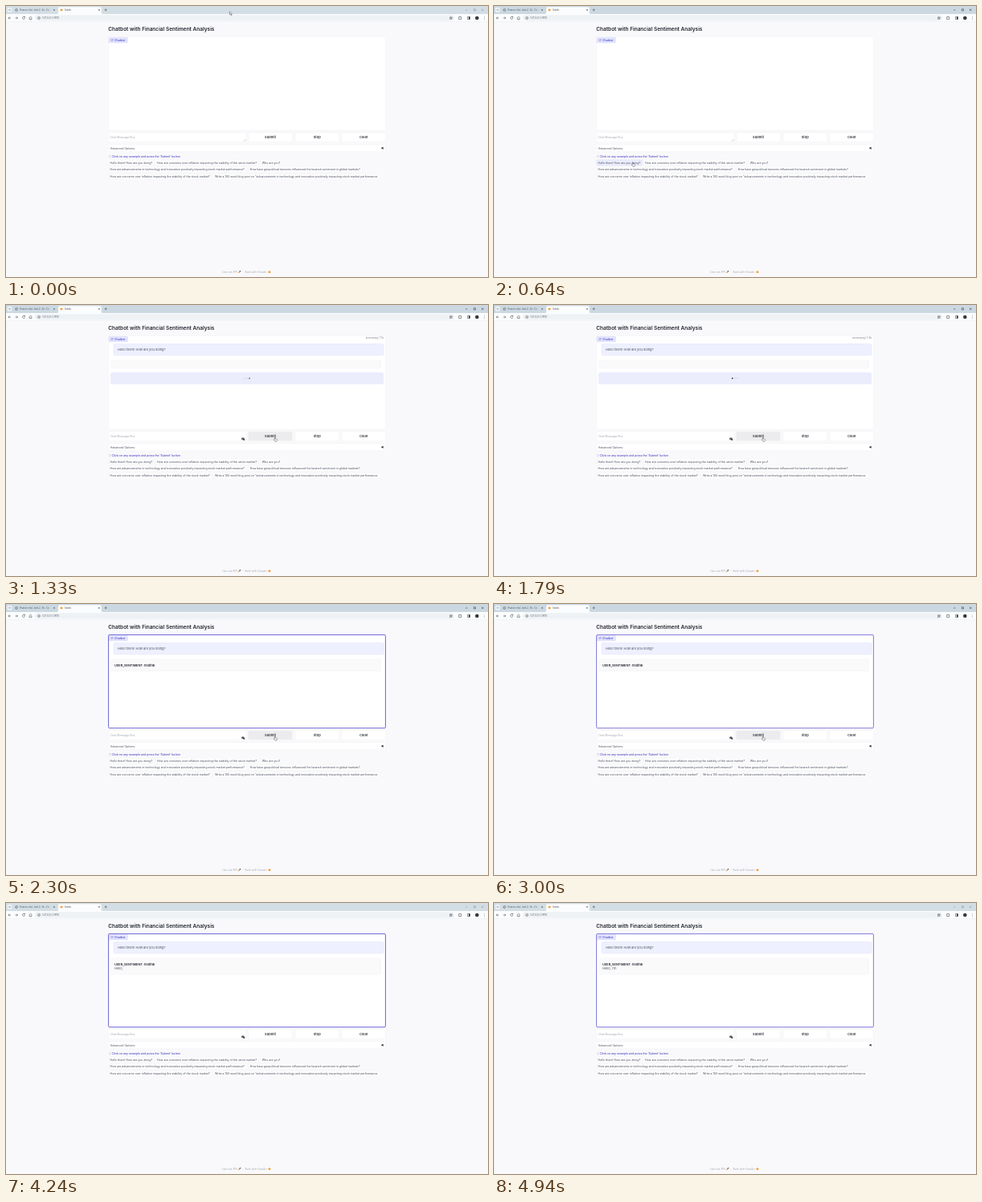
An HTML page that plays this animation: 600 by 338 pixels, repeating every 5 s.

```html
<!DOCTYPE html>
<html lang="en">
<head>
<meta charset="utf-8">
<title>Chatbot</title>
<style>
html, body { margin: 0; width: 100%; height: 100%; overflow: hidden; background: #f9f9fb; }
svg { display: block; width: 100vw; height: 100vh; }
text { font: 3.49px Inter, sans-serif; fill: #4b5160; white-space: pre; }
.ui { font: 2.7px "Open Sans", sans-serif; fill: #4a5258; }
.title { font-size: 6.5px; font-weight: 600; fill: #20242e; }
.button { font-size: 4.05px; font-weight: 600; fill: #2a2f3a; text-anchor: middle; }
.message { font-size: 3.95px; }
.strong { font-size: 3.88px; font-weight: 600; fill: #22262f; }
.accent { fill: #5148c8; font-weight: 500; }
.pale { fill: #a5a9b3; }
.timer { font-size: 2.9px; fill: #6b7080; text-anchor: end; }
.line { fill: none; stroke: #4a5258; stroke-width: .6; }
</style>
</head>
<body>
<svg id="stage" viewBox="0 0 600 338"></svg>
<script>
const LOOP = 5000;
const stage = document.getElementById('stage');

const box = (x, y, w, h, fill, stroke = 'none', r = 1, id = '') =>
  `<rect id="${id}" x="${x}" y="${y}" width="${w}" height="${h}" rx="${r}" fill="${fill}" stroke="${stroke}" stroke-width=".4"/>`;
const text = (x, y, s, cls = '', id = '') => `<text id="${id}" x="${x}" y="${y}" class="${cls}">${s}</text>`;
const line = d => `<path class="line" d="${d}"/>`;
const dot = (x, y, r, fill) => `<circle cx="${x}" cy="${y}" r="${r}" fill="${fill}"/>`;
const button = (x, label, id = '') =>
  box(x, 158, 54.5, 11.3, '#fff', '#efeff3', 1.2, id) + text(x + 27.2, 165.1, label, 'button');
const chip = (x, y, w, s, id = '') =>
  box(x - 1.7, y - 4.6, w + 3.6, 6.8, '#fcfcfd', '#f1f1f5', 1.2, id) + text(x, y, s);

const inflation = 'How are concerns over inflation impacting the stability of the stock market?';
const advances = 'advancements in technology and innovation positively impacting stock market performance';

const browser = `
  ${box(0, 0, 600, 10, '#cfdbe3', 'none', 0, 'strip')}
  ${box(1.5, 1.8, 6, 6, '#eaf0f4', 'none', 1.6)}${line('M3.5 4.3l1.1 1.1l1.1 -1.1')}
  <circle class="line" cx="13" cy="5" r="1.4"/>
  ${text(17, 6, 'Finance chat - bert-2 - fin - Co', 'ui')}
  ${line('M59 4l1.8 1.8m0 -1.8l-1.8 1.8')}
  <path d="M63.5 10q1.5 0 1.5 -1.5V3q0 -1.7 1.7 -1.7H117q1.7 0 1.7 1.7V8.5q0 1.5 1.5 1.5z" fill="#fbfcfd"/>
  ${box(67.5, 3.8, 3, 2.4, '#f5a23a', 'none', .8)}${text(72.7, 6, 'Gradio', 'ui')}
  ${line('M115 4l1.8 1.8m0 -1.8l-1.8 1.8M124.2 3.4v3m-1.5 -1.5h3')}
  <path id="controls" fill="none" stroke-width=".55" d="M572 5h2.4M582.3 3.8h2.2v2.2h-2.2zM592 3.7l2.4 2.4m0 -2.4l-2.4 2.4"/>
  ${box(0, 10, 600, 9.6, '#fbfcfd', 'none', 0)}
  ${box(36, 11.2, 522, 7.2, '#eef2f5', 'none', 3.6)}
  ${line('M6 15H3m1.3 -1.4L3 15l1.3 1.4M11.5 15h3m-1.3 -1.4l1.3 1.4l-1.3 1.4')}
  ${line('M23.2 13.7a1.6 1.6 0 1 0 .4 1.6M23.6 12.8v1.3h-1.3M29 16.5v-2l1.5 -1.3l1.5 1.3v2z')}
  <circle class="line" cx="41" cy="15" r="1.4"/>
  <text class="ui" x="45" y="16.1" style="font-size:3.1px">127.0.0.1:7870</text>
  ${line('M553.8 13.2l.5 1.2h1.3l-1 .9l.4 1.3l-1.2 -.8l-1.2 .8l.4 -1.3l-1 -.9h1.3z')}
  ${line('M563.6 13.7h1v-.6h1v.6h1v3h-3zM574.5 13.5h3v3h-3z')}
  ${box(576, 13.5, 1.5, 3, '#333', 'none', 0)}
  ${dot(586.3, 15, 2.3, '#35383c')}
  ${[13.6, 15, 16.4].map(y => dot(595.5, y, .35, '#444')).join('')}
  ${box(0, 19.5, 600, .4, '#e6eaee', 'none', 0)}`;

const page = `
  ${text(127.3, 30.5, 'Chatbot with Financial Sentiment Analysis', 'title')}
  ${box(127.5, 38.5, 345, 116.5, '#fff', '#eeeef3', 1.2)}
  ${box(128, 39.2, 23.5, 6.7, '#e2e4fd', '#d3d6fa')}
  ${line('M131 41.6h2.2v1.5h-1.3l-.6 .6v-.6h-.3z').replace('class="line"', 'fill="none" stroke="#6a62d4" stroke-width=".4"')}
  ${text(135, 43.8, 'Chatbot', 'accent')}
  <rect id="glow" x="127.6" y="38.4" width="344.8" height="116.4" rx="1.3" fill="none" stroke="#5e55d4" stroke-width=".9"/>
  <g id="user">${box(134, 48.5, 336, 14.3, '#eef0ff', '#d9dcfa', 1.8)}
    ${text(139, 57.2, 'Hello there! How are you doing?', 'message')}</g>
  ${box(131, 69, 335.5, 10, '#fafafb', '#eeeef1', 1.6, 'bot')}
  ${text(135, 77.6, 'USER_SENTIMENT: neutral', 'strong', 'mood')}
  ${text(135, 82.9, '', 'message', 'reply')}
  <g id="pending">${box(130.5, 0, 339.3, 14.3, '#ebedfd', '#e0e3fb', 1.8)}
    ${[296.7, 299.9, 303.1].map(x => dot(x, 7.1, .85, '#23262e')).join('')}</g>
  ${text(470, 41.9, '', 'timer', 'timer')}
  ${box(127.5, 158, 171.5, 11.3, '#fff', '#f0f0f4', 1.2)}
  ${text(129.6, 164.9, '', '', 'input')}
  <path d="M296 168.5l2 -2m-1 2l1 -1" stroke="#888" stroke-width=".35"/>
  <g id="mark">${box(293.2, 165.4, 3.4, 2.6, '#555a62', 'none', .6)}${dot(296.3, 168, .9, '#33363c')}</g>
  ${button(301.8, 'Submit', 'submit')}${button(360, 'Stop')}${button(418, 'Clear')}
  ${box(127.5, 172.8, 345, 9, '#fff', '#f0f0f4', 1.2)}
  ${text(129.8, 178.6, 'Advanced Options:')}
  <path d="M466.8 177.3l2.8 -1.5v3z" fill="#22262f"/>
  <path d="M128.6 186.5h1.2m-1.2 1.2h1.2m-1.2 1.2h1.2" stroke="#8d87de" stroke-width=".4"/>
  ${text(131.6, 189, "Click on any example and press the 'Submit' button", 'accent')}
  ${chip(129.6, 196.6, 52.6, 'Hello there! How are you doing?', 'first')}
  ${chip(188, 196.6, 124.5, inflation)}
  ${chip(318.7, 196.6, 22.4, 'Who are you?')}
  ${chip(129.6, 205.3, 168.4, `How are ${advances}?`)}
  ${chip(303.8, 205.3, 137.6, 'How have geopolitical tensions influenced the bearish sentiment in global markets?')}
  ${chip(129.6, 214, 124.5, inflation)}
  ${chip(260, 214, 204, `Write a 150 word blog post on "${advances}.`)}
  ${text(269, 333, 'Use via API', 'pale')}
  <path d="M289.4 333l2 -2.4" stroke="#c8862f" stroke-width="1.1"/>${dot(291.6, 330.7, .7, '#4f555f')}
  ${text(294, 333, '·', 'pale')}
  ${text(297.5, 333, 'Built with Gradio', 'pale')}
  ${box(326.4, 330.6, 3, 2.4, '#f5a23a', 'none', .8)}`;

const pointer = `
  <g id="pointer" stroke="#222" stroke-width=".4" fill="#fff">
    <path id="arrow" d="M0 0v4l1 -.8l.7 1.5l.7 -.3l-.7 -1.5h1.2z"/>
    <path id="hand" d="M0 0q.5 -.5 1 0v1.6l1.8 .5q.6 .3 .4 1l-.5 1.7h-2.2l-1.5 -2q.2 -.7 1 -.2z"/>
  </g>`;

stage.innerHTML = browser + page + pointer;
const $ = id => document.getElementById(id);
const show = (id, on) => $(id).setAttribute('visibility', on ? 'visible' : 'hidden');
const set = (id, name, value) => $(id).setAttribute(name, value);
const dots = [...$('pending').querySelectorAll('circle')];

// Pointer stops: time, x, y
const stops = [[30, 278.6, 7], [360, 172.3, 195.3], [700, 172.3, 195.3], [960, 334.3, 165.3]];

function pointerAt(t) {
  const next = stops.findIndex(s => s[0] > t);
  if (next === 0) return stops[0].slice(1);
  if (next < 0) return stops.at(-1).slice(1);
  const [t0, x0, y0] = stops[next - 1], [t1, x1, y1] = stops[next];
  const p = (t - t0) / (t1 - t0), e = p * p * (3 - 2 * p);
  return [x0 + (x1 - x0) * e, y0 + (y1 - y0) * e];
}

function draw(t) {
  const [x, y] = pointerAt(t);
  const overChip = x < 184 && y > 191;
  const overSubmit = t > 700 && t < 3700 && x > 302;
  const active = t >= 640 && t < 4210;
  const sent = t >= 1105, started = t >= 1850;

  set('strip', 'fill', active ? '#cbd8e1' : '#d3dde4');
  set('controls', 'stroke', active ? '#33383d' : '#8d959b');
  set('pointer', 'transform', `translate(${x} ${y})`);
  show('pointer', t < 3700);
  set('arrow', 'display', overChip || overSubmit ? 'none' : 'inline');
  set('hand', 'display', overChip || overSubmit ? 'inline' : 'none');
  set('first', 'fill', overChip ? '#eceefe' : '#fcfcfd');
  set('first', 'stroke', overChip ? '#c9cdf6' : '#f1f1f5');
  set('submit', 'fill', overSubmit ? '#ececee' : '#fff');
  show('mark', t >= 960);

  const filled = t >= 670 && !sent;
  $('input').textContent = filled ? 'Hello there! How are you doing?' : 'Chat Message Box';
  set('input', 'class', filled ? '' : 'pale');

  show('user', sent);
  show('bot', sent);
  set('bot', 'height', t >= 3210 ? 20 : started ? 14.4 : 10);
  show('mood', started);
  $('reply').textContent =
    t >= 4790 ? "Hello, I'm" : t >= 4450 ? 'Hello, I' : t >= 3520 ? 'Hello,' : t >= 3210 ? 'Hello' : '';

  const waiting = t >= 1047 && !started;
  show('pending', waiting);
  set('pending', 'transform', `translate(0 ${sent ? 84.3 : 48.4})`);
  dots.forEach((d, i) => {
    const phase = ((t - (sent ? 1105 : 1047)) / 343 - i / 4 + 2) % 1;
    const away = Math.min(phase, 1 - phase);
    d.setAttribute('opacity', .12 + .88 * Math.max(0, 1 - 4 * away) ** .5);
  });
  const seconds = (.1 + Math.max(0, t - 1090) / 250).toFixed(1);
  $('timer').textContent = waiting ? (sent ? 'processing | ' : '') + seconds + 's' : '';

  show('glow', started);
  set('glow', 'opacity', .93 + .07 * Math.cos((t - 2300) / 487 * 2 * Math.PI));
}

const start = performance.now();
function frame() {
  draw((performance.now() - start) % LOOP);
  requestAnimationFrame(frame);
}
frame();
</script>
</body>
</html>
```
